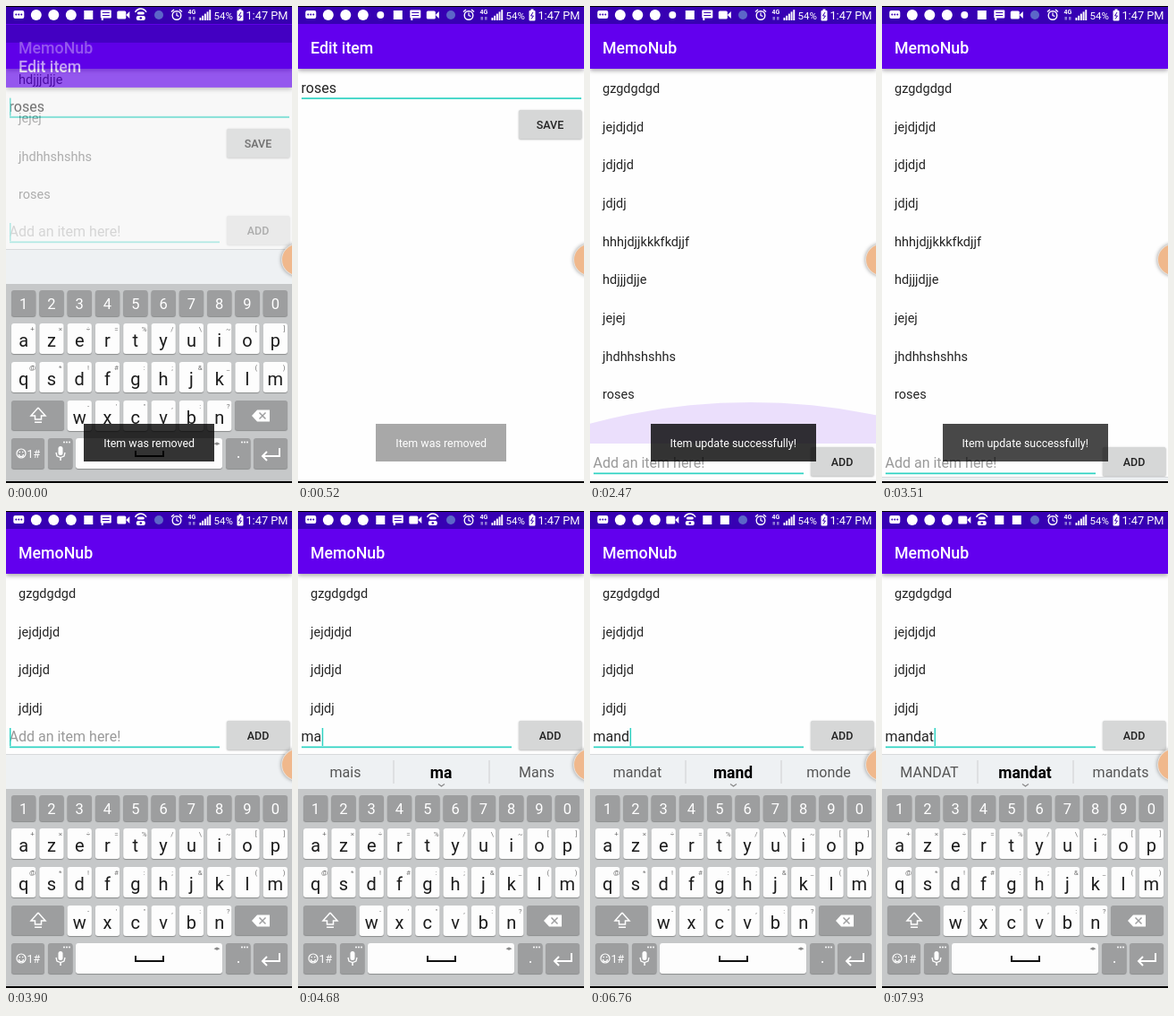
Write an HTML page with a canvas that moves like this. It is 320 by 532 pixels and loops after 8 s.

```html
<!DOCTYPE html>
<html lang="en">
<head>
<meta charset="utf-8">
<title>List app</title>
<style>
html, body { margin: 0; width: 100%; height: 100%; overflow: hidden; background: #fff; }
canvas { display: block; width: 320px; height: 532px; }
</style>
</head>
<body>
<canvas id="stage" width="320" height="532"></canvas>
<script>
const LOOP = 8000, W = 320, H = 532;
const ITEMS = ['gzgdgdgd', 'jejdjdjd', 'jdjdjd', 'jdjdj', 'hhhjdjjkkkfkdjjf', 'hdjjjdjje', 'jejej', 'jhdhhshshhs', 'roses'];
const TEAL = '#2fd3c3', INK = '#242424', GREY = '#9d9e9f';

// time, key pressed, field text, suggestions
const EDITS = [
  [4290, 'm', 'm', 'Me m ma'],
  [4550, 'a', 'ma', 'mais ma Mans'],
  [4810, 'j', 'maj', 'mais maj Mans'],
  [5070, 'd', 'majd', 'land majd Mans'],
  [5720, '<', 'maj', 'mais maj Mans'],
  [5960, '<', 'ma', 'mais ma Mans'],
  [6370, 'n', 'man', 'Mans man mange'],
  [6630, 'd', 'mand', 'mandat mand monde'],
  [7020, 'a', 'manda', 'manger manda mandat'],
  [7540, 't', 'mandat', 'MANDAT mandat mandats']
];

const stage = document.getElementById('stage').getContext('2d');
const layer = Object.assign(document.createElement('canvas'), { width: W, height: H }).getContext('2d');
let g = stage;

const clamp = v => Math.max(0, Math.min(1, v));
const ramp = (t, a, b) => clamp((t - a) / (b - a));
const ease = p => (1 - Math.cos(Math.PI * p)) / 2;
const within = (t, a, b) => t >= a && t < b;

function rect(x, y, w, h, fill) {
  g.fillStyle = fill;
  g.fillRect(x, y, w, h);
}
function round(x, y, w, h, r, fill) {
  g.fillStyle = fill;
  g.beginPath();
  g.roundRect(x, y, w, h, r);
  g.fill();
}
function disc(x, y, r, fill) {
  g.fillStyle = fill;
  g.beginPath();
  g.arc(x, y, r, 0, 7);
  g.fill();
}
function text(s, x, y, size, fill, align = 'left', weight = 400) {
  g.font = `${weight} ${size}px Roboto, sans-serif`;
  g.textAlign = align;
  g.fillStyle = fill;
  g.fillText(s, x, y);
}
function line(points, color, width = 1.5) {
  g.strokeStyle = color;
  g.lineWidth = width;
  g.beginPath();
  points.forEach(([x, y]) => g.lineTo(x, y));
  g.stroke();
}
function faded(alpha, draw) {
  g.save();
  g.globalAlpha *= alpha;
  draw();
  g.restore();
}
// Draws a group on its own layer, then blends it as one picture.
function grouped(alpha, dy, draw) {
  if (!alpha) return;
  g = layer;
  g.clearRect(0, 0, W, H);
  draw();
  g = stage;
  faded(alpha, () => g.drawImage(layer.canvas, 0, dy));
}
function shadowed(blur, dy, alpha, draw) {
  g.save();
  g.shadowColor = `rgba(0,0,0,${alpha})`;
  g.shadowBlur = blur;
  g.shadowOffsetY = dy;
  draw();
  g.restore();
}

function header(title) {
  shadowed(5, 2, .35, () => rect(0, 20, W, 50, '#6200ee'));
  rect(0, 0, W, 20, '#3700b3');
  text(title, 14, 52.5, 17.8, '#fff', 'left', 500);
}
function button(label, y, fill = '#d6d7d7') {
  shadowed(2, .5, .3, () => round(247, y, 70.5, 32.5, 2, fill));
  text(label, 282, y + 20.7, 12.5, INK, 'center', 500);
}
function field(value, hint, y, right, caret) {
  rect(4, y + 5.5, right - 4, 1.7, TEAL);
  text(value || hint, 3.5, y, 16, value ? INK : '#999');
  if (caret) rect(value && hint ? 4 + g.measureText(value).width : 4, y - 15, 1.5, 20, TEAL);
}

function listCaret(t, last) {
  if (last) return (t - last[0]) % 1000 < 500;
  return t < 2210 || within(t, 2600, 3120) || t >= 3600;
}
function listScreen(t, last) {
  const lift = t < 390 || t >= 3770 ? 258 : 0;
  const shift = t < 1000 ? -223 : -223 * (1 - ease(ramp(t, 1557, 1807)));
  rect(0, 0, W, H, '#fefefe');
  g.save();
  g.beginPath();
  g.rect(0, 70, W, 418 - lift);
  g.clip();
  ITEMS.forEach((item, i) => {
    let alpha = 1;
    if (t > 1000 && i < 4) alpha = ramp(t, 1820, 2080);
    if (t > 1000 && i === 8) alpha = .5 + .5 * ramp(t, 1600, 1820);
    faded(alpha, () => text(item, 14, 97 + 42.65 * i + shift, 14.5, INK));
  });
  const glow = ramp(t, 2200, 2440) * (1 - ramp(t, 2480, 2860));
  if (glow) faded(glow, () => disc(180, 488 - 46 * glow + 697, 697, 'rgba(98,0,238,.12)'));
  g.restore();
  header('MemoNub');
  field(last ? last[2] : '', 'Add an item here!', 515 - lift, 239, listCaret(t, last));
  button('ADD', 492 - lift);
}
function editScreen(t) {
  rect(0, 0, W, H, '#fefefe');
  header('Edit item');
  field('roses', '', 96.7, 317, t < 260 || t >= 1040);
  button('SAVE', 116, within(t, 1300, 1600) ? '#c3c4c4' : '#d6d7d7');
}
function editWindow(t) {
  const opening = t < 1560;
  const settled = ramp(t, 0, 260);
  const alpha = opening ? .65 + .35 * ramp(t, 0, 200) : 1 - ramp(t, 1560, 1830);
  const dy = opening ? 21 * (1 - settled) ** 2 : (t - 1560) * .098;
  grouped(alpha, dy, () => editScreen(t));
  const dim = opening ? .025 * (1 - settled) : .18 * alpha * (1 - alpha);
  rect(0, 0, W, H, `rgba(0,0,0,${dim})`);
}

function suggestions(words) {
  words.forEach((word, i) => {
    const mid = i === 1;
    text(word, 53 + 107 * i, mid ? 298 : 297, mid ? 17.5 : 16, mid ? '#000' : '#555', 'center', mid ? 700 : 400);
  });
  [106.5, 213.5].forEach(x => rect(x, 278, 1, 26, '#cdd0d2'));
  line([[157, 304.5], [160.5, 307], [164, 304.5]], '#888', 1.2);
}
function keyboard(pressed, words) {
  const key = (id, x, y, w, h, fill) =>
    shadowed(1, 1, .3, () => round(x, y, w, h, 3, id && id === pressed ? '#b4c3cc' : fill));
  const row = (letters, marks, start, y) => [...letters].forEach((c, i) => {
    const x = 6 + 31.3 * (i + start);
    key(c, x, y, 27.3, 34, '#fdfdfd');
    text(c, x + 13.6, y + 25.5, 20, '#1c1c1c', 'center');
    text(marks[i], x + 23.5, y + 8.5, 8, '#777', 'center');
  });

  rect(0, 272, W, 38, '#eef1f3');
  rect(0, 271, W, 1, '#d8dadc');
  rect(0, 310, W, 222, '#c6c8c9');
  if (words) suggestions(words);

  [...'1234567890'].forEach((c, i) => {
    const x = 6 + 31.3 * i;
    key('', x, 317, 27.3, 29, GREY);
    text(c, x + 13.6, 338, 16.5, '#fff', 'center');
  });
  row('azertyuiop', '+×÷=%/\\~[]', 0, 354);
  row('qsdfghjklm', '@*!#:;&_()', 0, 397);
  row('wxcvbn', '-\'",:?', 2, 440);

  key('', 6, 440, 59, 33, GREY);
  line([[36, 448], [44, 457], [39.5, 457], [39.5, 461], [32.5, 461], [32.5, 457], [28, 457], [36, 448]], '#fff');
  rect(32, 463.5, 8, 1.5, '#fff');

  key('<', 256, 440, 59, 33, GREY);
  g.fillStyle = '#fff';
  g.beginPath();
  [[275, 457], [281, 450.5], [295, 450.5], [295, 463.5], [281, 463.5]].forEach(p => g.lineTo(...p));
  g.fill();
  line([[283.5, 453.5], [290.5, 460.5]], GREY);
  line([[290.5, 453.5], [283.5, 460.5]], GREY);

  key('', 6, 482, 37, 34, GREY);
  g.strokeStyle = '#fff';
  g.lineWidth = 1.2;
  g.beginPath();
  g.arc(17, 499, 5, 0, 7);
  g.moveTo(19.5, 500);
  g.arc(17, 500, 2.5, 0, Math.PI);
  g.stroke();
  disc(15.3, 497.5, .8, '#fff');
  disc(18.7, 497.5, .8, '#fff');
  text('1#', 23.5, 503.5, 12.5, '#fff');

  key('', 47, 482, 27.5, 34, GREY);
  round(58.5, 491, 5, 10, 2.5, '#fff');
  line([[56, 498], [57, 502], [61, 503.5], [65, 502], [66, 498]], '#fff', 1.3);
  rect(60.3, 503, 1.5, 4, '#fff');

  key('', 78, 482, 164, 34, '#fdfdfd');
  line([[145, 496], [145, 502], [176, 502], [176, 496]], '#111', 2);
  text('◂▸', 236, 490, 7, '#888', 'center');

  key('', 246, 482, 27.5, 34, GREY);
  text('.', 260, 504, 18, '#fff', 'center');
  [65, 264].forEach(x => [0, 3, 6].forEach(d => disc(x + d, 486.5, 1, '#fff')));

  key('', 277, 482, 38, 34, GREY);
  line([[306, 493], [306, 502], [288, 502]], '#fff', 2);
  line([[292, 497], [287, 502], [292, 507]], '#fff', 2);
}

const ICONS = {
  d(x) {
    round(x - 6, 5, 12, 9, 2, '#fff');
    [-3, 0, 3].forEach(d => disc(x + d, 9.5, 1, '#3700b3'));
  },
  o(x) { disc(x, 10, 6, '#fff'); },
  u(x) { disc(x, 10, 4, '#fff'); },
  y(x) { rect(x - 5, 5, 10, 10, '#fff'); },
  c(x) {
    round(x - 6, 4.5, 12, 9, 1, '#fff');
    line([[x - 4, 13], [x - 4, 16]], '#fff', 2);
    rect(x - 4, 7, 8, 1, '#3700b3');
    rect(x - 4, 10, 8, 1, '#3700b3');
  },
  v(x) {
    round(x - 7, 5.5, 10, 9, 1.5, '#fff');
    g.beginPath();
    [[x + 3, 10], [x + 7, 6], [x + 7, 14]].forEach(p => g.lineTo(...p));
    g.fill();
  },
  p(x) {
    g.strokeStyle = '#fff';
    g.lineWidth = 1.6;
    g.beginPath();
    g.arc(x, 10, 7, 3.6, 5.8);
    g.stroke();
    round(x - 4, 6.5, 8, 3, 1.5, '#fff');
    round(x - 5, 11, 10, 5, 2, '#fff');
    disc(x, 13.5, 1.3, '#3700b3');
  }
};
function statusBar(t) {
  let order = 'dooouycv';
  if (t >= 6110) order = 'dooovpyy';
  else if (t >= 5200) order = 'dooycovp';
  else if (t < 260 || t >= 3640) order = 'doooycvp';
  [...order].forEach((c, i) => ICONS[c](14.3 + 19.5 * i));
  disc(171, 10, 5, '#5c66c8');

  g.strokeStyle = '#fff';
  g.lineWidth = 1.4;
  g.beginPath();
  g.arc(191, 10.5, 4.8, 0, 7);
  g.stroke();
  line([[191, 7.5], [191, 10.5], [193.5, 11.5]], '#fff', 1.2);
  line([[185, 6.5], [188, 4]], '#fff');
  line([[194, 4], [197, 6.5]], '#fff');

  text('4G', 208, 9, 7, '#fff', 'center', 700);
  const busy = within(t, 910, 1040) || t >= 4290 && Math.floor(t / 260) % 3 === 1;
  [205.5, 210].forEach(x => rect(x - 1, 12, 2.5, 3.5, busy ? '#fff' : '#8f78d6'));
  for (let i = 0; i < 5; i++) rect(216.5 + 2.7 * i, 13 - 2.2 * i, 1.9, 3 + 2.2 * i, '#fff');
  text('54%', 232.5, 14.5, 11.5, '#fff');
  rect(260.5, 3.5, 3, 2, '#fff');
  round(258.5, 5, 7, 11.5, 1, '#fff');
  line([[263, 7], [260.5, 11], [263.5, 11], [261, 14.5]], '#3700b3', 1);
  text('1:47 PM', 315.5, 15, 12.8, '#fff', 'right');
}

function toast(message, x, w, alpha) {
  grouped(alpha, 0, () => {
    rect(x, 466, w, 42, 'rgba(0,0,0,.8)');
    text(message, 160.2, 492, 12.44, '#fff', 'center');
  });
}

function draw(t) {
  const last = EDITS.filter(e => t >= e[0]).pop();
  listScreen(t, last);
  if (t < 1830) editWindow(t);

  const hidden = t < 1000 ? ease(ramp(t, 100, 390)) : 1 - ease(ramp(t, 3480, 3800));
  if (hidden < 1) {
    g.save();
    g.translate(0, 260 * hidden);
    keyboard(last && t < last[0] + 130 ? last[1] : '', last && last[3].split(' '));
    g.restore();
  }
  statusBar(t);
  toast('Item was removed', 87, 146, 1 - ramp(t, 390, 615));
  toast('Item update successfully!', 68, 185, ramp(t, 1560, 1800) * (1 - ramp(t, 3480, 3770)));
  shadowed(4, 0, .4, () => disc(326, 283, 18, '#e6e0da'));
  disc(326, 283, 17, '#f0b88c');
  rect(0, 0, W, 1, '#000');
  rect(0, 530, W, 2, '#000');
}

const start = performance.now();
function tick() {
  draw((performance.now() - start) % LOOP);
  requestAnimationFrame(tick);
}
tick();
</script>
</body>
</html>
```
